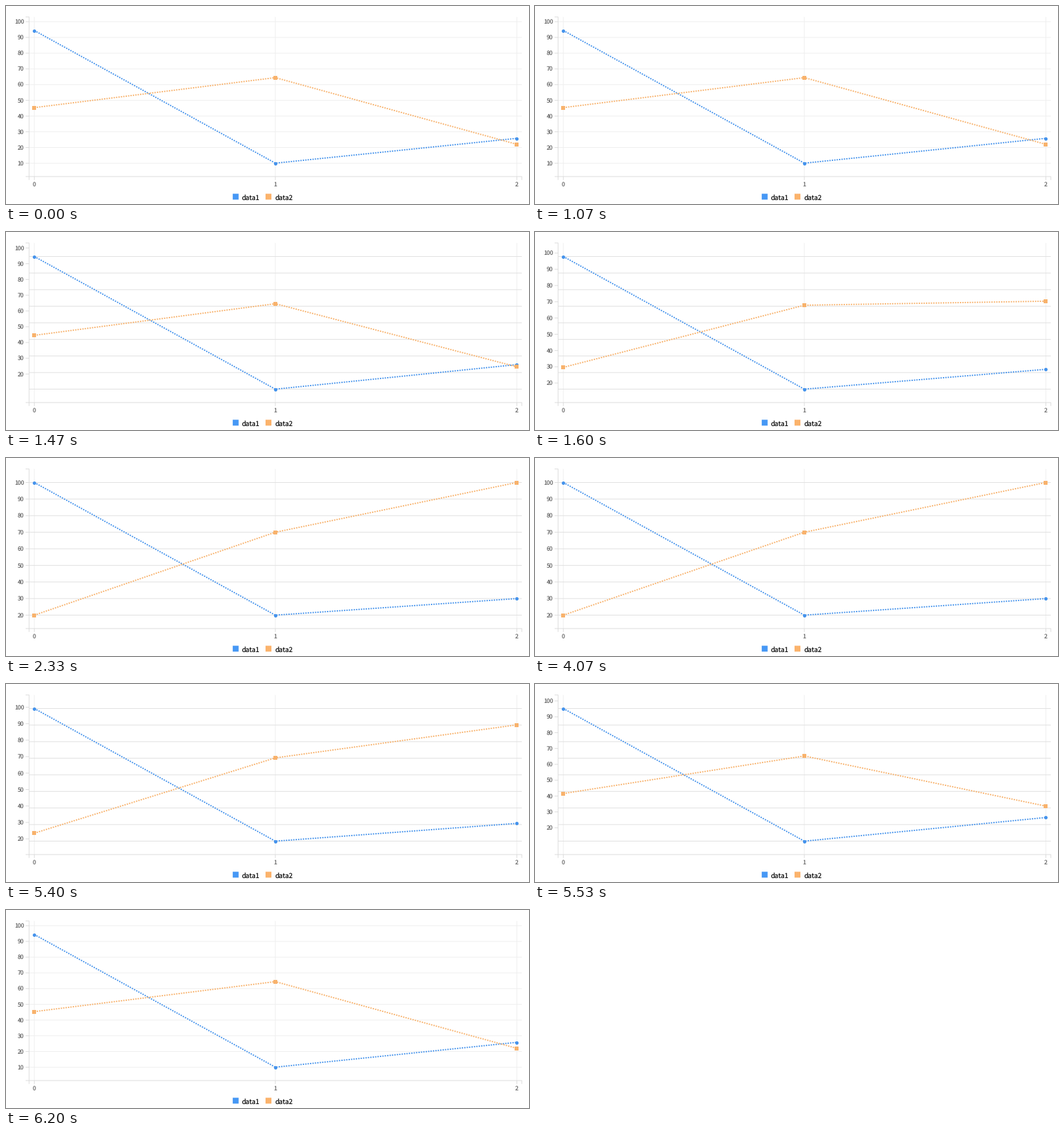
A matplotlib script that plays this animation: 800x303 px, repeating every 7070 ms.

```python
import numpy as np
import matplotlib.pyplot as plt
from matplotlib.animation import FuncAnimation
from matplotlib.patches import Rectangle

LOOP_MS, FRAMES, FPS = 7070, 202, 15
STEP_MS = LOOP_MS // FRAMES
DPI = 100
PX = 72 / DPI  # one pixel in points

# Unhinted text and unsnapped strokes keep fractional pixel positions
plt.rcParams["text.hinting"] = "none"
plt.rcParams["path.snap"] = False

LEFT, RIGHT, TOP, BOTTOM = 35.3, 789, 16.8, 261
XS = np.array([43.3, 412, 781.4])
BLUE, ORANGE = "#4593ec", "#f8b26c"
AXIS, FAINT, STRONG = "#dcdcdc", "#efefef", "#e0e0e0"

# Vertical pixel positions before and after the data update
TICKS_OLD = 24 + 24.07 * np.arange(10)
TICKS_NEW = 37.5 + 25.37 * np.arange(9)
BLUE_OLD, BLUE_NEW = np.array([37.5, 240.5, 202.5]), np.array([37.5, 240.5, 215.1])
ORANGE_OLD, ORANGE_NEW = np.array([155.5, 109.6, 211.7]), np.array([240.5, 113.6, 37.5])

fig = plt.figure(figsize=(8, 3.03), dpi=DPI, facecolor="white")
ax = fig.add_axes([0, 0, 1, 1])
ax.set_xlim(0, 800)
ax.set_ylim(303, 0)
ax.axis("off")


def stroke(xs, ys, color, z=1):
    return ax.plot(xs, ys, color=color, lw=PX, zorder=z, solid_capstyle="butt")[0]


def label(x, y, text, size, color, ha):
    return ax.text(x, y, text, fontsize=size * PX, color=color, ha=ha,
                   va="baseline", family="Noto Sans CJK JP")


def series(color, marker, size, z):
    return ax.plot(XS, XS, color=color, lw=1.95 * PX, ls=(0, (1, 0.9)),
                   dash_capstyle="butt", marker=marker, ms=size * PX,
                   mew=0, zorder=z)[0]


def ease(u):
    u = min(max(u, 0), 1)
    return 4 * u ** 3 if u < 0.5 else 1 - 4 * (1 - u) ** 3


def mix(a, b, p):
    return a + (b - a) * p


# Fixed axes, vertical grid and legend
for i, x in enumerate(XS):
    stroke([x, x], [TOP, BOTTOM], FAINT)
    stroke([x, x], [BOTTOM, 266.2], AXIS, 2)
    label(x, 276, str(i), 8.8, "#666666", "center")
stroke([30, LEFT, LEFT, 30], [TOP, TOP, BOTTOM, BOTTOM], AXIS, 2)
stroke([LEFT, LEFT, RIGHT, RIGHT], [266.2, BOTTOM, BOTTOM, 266.2], AXIS, 2)
for x, name, color in [(346.8, "data1", "#4698f5"), (397, "data2", "#fbb36c")]:
    ax.add_patch(Rectangle((x, 287.3), 9, 9, color=color, lw=0))
    label(x + 14.2, 297, name, 10.2, "#111111", "left")

grid = [stroke([LEFT, RIGHT], [y, y], FAINT) for y in TICKS_OLD]
ticks = [stroke([30, LEFT], [y, y], AXIS, 2) for y in TICKS_OLD]
names = [label(27.6, y, str(100 - 10 * i), 8.8, "#666666", "right")
         for i, y in enumerate(TICKS_OLD)]
blue = series(BLUE, "o", 5.2, 4)
orange = series(ORANGE, "s", 5.2, 5)


def update(frame):
    # The clip is sampled at 15 steps a second and plays out, then back
    k = (frame * STEP_MS + 30) * FPS // 1000
    p = ease(0.1705 * min(k - 20.84, 84.93 - k))
    updated = 20 <= k <= 85

    for i, (line, tick, name) in enumerate(zip(grid, ticks, names)):
        shown = i < 9 or not updated
        for artist in (line, tick, name):
            artist.set_visible(shown)
        if shown:
            y = mix(TICKS_OLD[i], TICKS_NEW[i], p) if updated else TICKS_OLD[i]
            grid_y = TICKS_NEW[i] if updated else TICKS_OLD[i]
            line.set_ydata([grid_y, grid_y])
            line.set_color(STRONG if updated else FAINT)
            tick.set_ydata([y, y])
            name.set_y(y + 3.1)
    blue.set_ydata(mix(BLUE_OLD, BLUE_NEW, p))
    orange.set_ydata(mix(ORANGE_OLD, ORANGE_NEW, p))
    return [*grid, *ticks, *names, blue, orange]


anim = FuncAnimation(fig, update, frames=FRAMES, interval=STEP_MS,
                     repeat=True, repeat_delay=0, blit=False)
plt.show()
```
